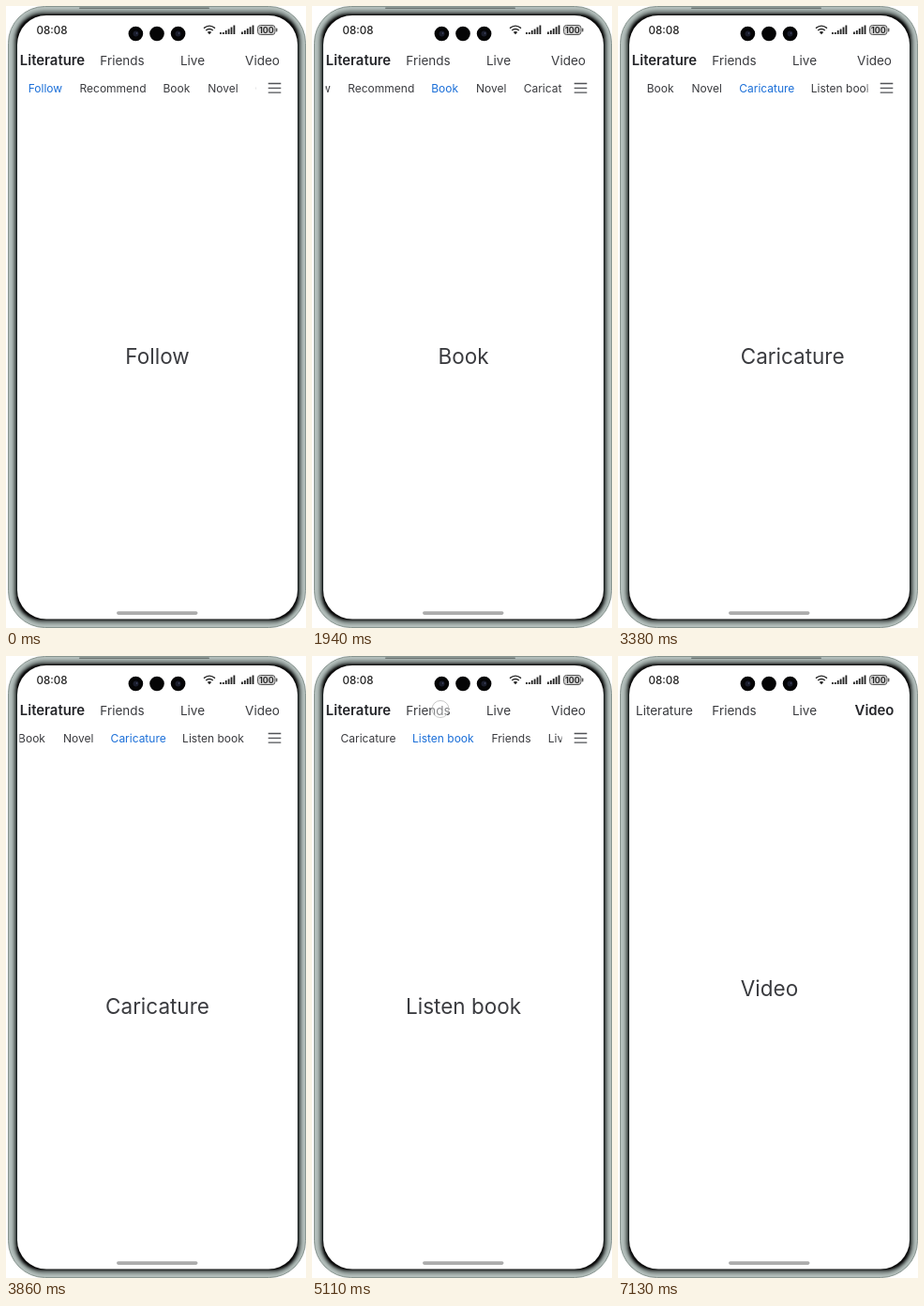
Recreate the animation shown at these times as an HTML page. Size 320x662 px, loop 8.09 s.

```html
<!DOCTYPE html>
<html lang="en">
<head>
<meta charset="utf-8">
<title>Nested tabs</title>
<style>
  html, body { margin: 0; width: 100%; height: 100%; overflow: hidden; background: #fff; }
  svg { display: block; width: 100%; height: 100%; font-family: Inter, Roboto, sans-serif; fill: #3a3b3f; }
  .top { font-size: 13.5px; text-anchor: middle; }
  .top.on { font-size: 14.9px; font-weight: 600; fill: #242529; }
  .sub { font-size: 12px; }
  .sub.on { fill: #1b6fd8; }
  .big { font-size: 22.5px; text-anchor: middle; }
</style>
</head>
<body>
<svg viewBox="0 0 320 662">
  <defs>
    <clipPath id="screen"><rect x="12" y="10" width="299" height="642.5" rx="31"/></clipPath>
    <clipPath id="strip"><rect x="14.5" y="76" width="252" height="24"/></clipPath>
    <filter id="soft" x="-5%" y="-5%" width="110%" height="110%"><feGaussianBlur stdDeviation=".8"/></filter>
  </defs>

  <rect x="2.5" y=".5" width="317" height="661" rx="39" fill="#b3bebb" stroke="#87948f"/>
  <g filter="url(#soft)">
    <rect x="7" y="4" width="309" height="654" rx="34" fill="#87928f"/>
    <rect x="9.7" y="7.5" width="303.6" height="647.2" rx="29" fill="#0c0a0c"/>
  </g>
  <rect x="78" y="1.5" width="139" height="1.6" rx=".8" fill="#6a7471"/>
  <rect x="12" y="10" width="299" height="642.5" rx="31" fill="#fff"/>

  <g clip-path="url(#screen)">
    <g id="literature">
      <g id="pages"></g>
      <g clip-path="url(#strip)"><g id="subs"></g></g>
      <path d="M279.7 82.5h13.6M279.7 87.3h13.6M279.7 92.1h13.6" stroke="#505256" stroke-width="1.3"/>
    </g>
    <g id="outer"></g>
    <g id="tops"></g>
  </g>

  <g fill="#222">
    <text x="32.5" y="30" font-size="11.6" font-weight="500">08:08</text>
    <path d="M211 23.6q6-5 12 0M213.2 26q3.8-3.2 7.6 0" fill="none" stroke="#222" stroke-width="1.4"/>
    <path d="M214.7 27.8q2.3-1.8 4.6 0l-2.3 2.5z"/>
    <g id="bars"></g>
    <rect x="268.5" y="20.5" width="18.5" height="10" rx="3" fill="#d2d2d2" stroke="#555"/>
    <rect x="288" y="23.5" width="1.4" height="4" rx=".7" fill="#555"/>
    <text x="277.8" y="28.9" font-size="9" font-weight="600" text-anchor="middle">100</text>
  </g>
  <g fill="#050506">
    <circle cx="138.4" cy="29.5" r="7.8"/><circle cx="161" cy="29.5" r="7.8"/><circle cx="183.6" cy="29.5" r="7.8"/>
    <g fill="#1a1d2b"><circle cx="138.5" cy="29.5" r="3"/><circle cx="183.5" cy="29.5" r="3"/></g>
    <g fill="#4a5170"><circle cx="139.5" cy="29" r=".8"/><circle cx="184.5" cy="29" r=".8"/></g>
  </g>
  <rect x="118" y="644.3" width="86.5" height="3.6" rx="1.8" fill="#acacac"/>
  <circle id="touch" cy="56.5" r="9" fill="#fff" fill-opacity=".4" stroke="#b9b9b9" stroke-width=".8"/>
</svg>
<script>
const LOOP = 8090, WIDTH = 299, CENTER = 161.5;
const $ = id => document.getElementById(id);

function add(parent, tag, attrs, text = '') {
  const el = document.createElementNS('http://www.w3.org/2000/svg', tag);
  for (const key in attrs) el.setAttribute(key, attrs[key]);
  el.textContent = text;
  return $(parent).appendChild(el);
}

// label, x in the strip, scroll once selected
const subTabs = [
  ['Follow', 23.7, 0], ['Recommend', 78.5, 0], ['Book', 167.5, 42.5], ['Novel', 215.3, 91],
  ['Caricature', 266, 154.5], ['Listen book', 342.5, 235.5], ['Friends', 427], ['Live', 487.3]
];
const topTabs = [['Literature', 49.5], ['Friends', 124], ['Live', 199], ['Video', 273.5]];

// start and time stretch of each swipe
const swipes = [[40, 1.6], [1540, 1], [2340, 1], [3140, 1], [3980, 1]];
// press, slide start, slide end, x of the finger
const taps = [[5110, 5190, 5470, 137], [5840, 5960, 6340, 199], [6730, 6810, 7120, 273]];
const SELECT = 120;

const subs = subTabs.map(([label, x]) => add('subs', 'text', { x, y: 91.8 }, label));
const tops = topTabs.map(([label, x]) => add('tops', 'text', { x, y: 62.9 }, label));
subTabs.slice(0, 6).forEach(([label], i) =>
  add('pages', 'text', { class: 'big', x: CENTER + i * WIDTH, y: 381.4 }, label));
topTabs.slice(1).forEach(([label], i) =>
  add('outer', 'text', { class: 'big', x: CENTER + (i + 1) * WIDTH, y: 362.3 }, label));

function signal(x, heights) {
  heights.forEach((h, i) => add('bars', 'rect', { x: x + i * 2.9, y: 30 - h, width: 1.8, height: h }));
}
signal(228, [2, 2, 4, 5.5, 7.5, 9.5]);
signal(251, [2.5, 4, 6, 7.8, 9.5]);

const clamp = u => Math.min(1, Math.max(0, u));
const shift = (id, x) => $(id).setAttribute('transform', `translate(${x.toFixed(2)} 0)`);
const slide = u => 1 - (1 - clamp(u)) ** 3;

// finger drag, then fling to rest
const swipe = t => t < 140
  ? 0.45 * clamp(t / 140) ** 1.5
  : 1 - 0.55 * (1 - clamp((t - 140) / 260)) ** 3.86;

const glide = t => 1 - Math.exp(-Math.max(0, t - SELECT) / 95);

function select(els, kind, index) {
  els.forEach((el, i) => el.setAttribute('class', i === index ? kind + ' on' : kind));
}

function render(t) {
  let page = 0, scroll = 0, sub = 0, outer = 0, top = 0;
  swipes.forEach(([start, stretch], i) => {
    const dt = (t - start) / stretch;
    page += swipe(dt);
    scroll += (subTabs[i + 1][2] - subTabs[i][2]) * glide(dt);
    if (dt >= SELECT) sub = i + 1;
  });
  let finger = null;
  taps.forEach(([press, start, end, x], i) => {
    outer += slide((t - start) / (end - start));
    if (t >= start) top = i + 1;
    if (t >= press && t < start) finger = x;
  });
  shift('pages', -page * WIDTH);
  shift('subs', -scroll);
  shift('literature', -outer * WIDTH);
  shift('outer', -outer * WIDTH);
  select(subs, 'sub', sub);
  select(tops, 'top', top);
  $('touch').setAttribute('visibility', finger === null ? 'hidden' : 'visible');
  if (finger !== null) $('touch').setAttribute('cx', finger);
}

const begin = performance.now();
function tick() {
  render((performance.now() - begin) % LOOP);
  requestAnimationFrame(tick);
}
tick();
</script>
</body>
</html>
```
